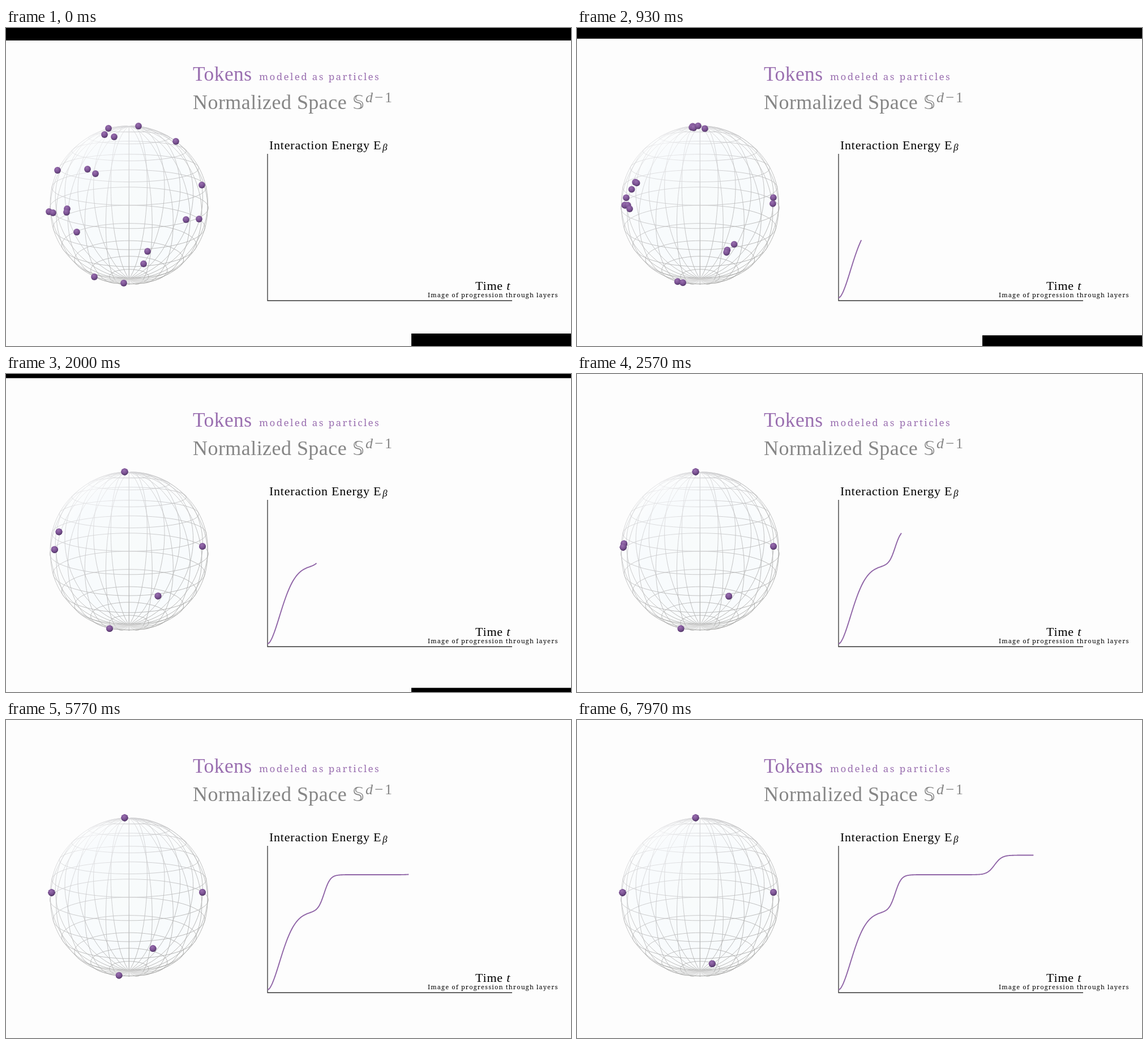
An HTML page for the animation above (8 s loop, 998x561 px).

```html
<!DOCTYPE html>
<html lang="en">
<head>
<meta charset="utf-8">
<title>Tokens on a sphere</title>
<style>
  html, body { margin: 0; width: 100%; height: 100%; overflow: hidden; background: #fdfdfd; }
  svg { display: block; width: 100%; height: 100%; }
  text { font-family: "Liberation Serif", serif; }
  .small { font-family: "Noto Serif", serif; }
  .math { font-family: "DejaVu Sans", sans-serif; }
  .purple { fill: #9a6fb0; }
  .grey { fill: #868686; }
  .italic { font-style: italic; }
</style>
</head>
<body>
<svg viewBox="0 0 998 561">
  <defs>
    <radialGradient id="glass">
      <stop offset="0" stop-color="#f8fbfb"/>
      <stop offset=".75" stop-color="#f8fbfd"/>
      <stop offset="1" stop-color="#fcfdfd"/>
    </radialGradient>
    <radialGradient id="wire" gradientUnits="userSpaceOnUse" cx="150" cy="200" r="290">
      <stop offset="0" stop-color="#ececee"/>
      <stop offset=".35" stop-color="#cdcdcf"/>
      <stop offset="1" stop-color="#a2a2a0"/>
    </radialGradient>
    <radialGradient id="ball" cx=".4" cy=".3" r=".75">
      <stop offset="0" stop-color="#9a70b0"/>
      <stop offset=".55" stop-color="#7c5394"/>
      <stop offset="1" stop-color="#4f3564"/>
    </radialGradient>
  </defs>

  <circle cx="217.5" cy="313" r="140" fill="url(#glass)"/>
  <path id="mesh" fill="none" stroke="url(#wire)" stroke-width=".85"/>
  <ellipse cx="217" cy="446" rx="28" ry="5" fill="#e4e4e4" opacity=".6"/>

  <text class="purple" x="330" y="92.5" font-size="35.5" letter-spacing=".4">Tokens</text>
  <text class="purple small" x="447" y="92" font-size="17" letter-spacing="2.4">modeled as particles</text>
  <g class="grey">
    <text x="330" y="143" font-size="36" letter-spacing=".45">Normalized Space</text>
    <text class="math" x="612" y="143" font-size="33">𝕊</text>
    <text class="italic" x="635" y="130.5" font-size="26">d</text>
    <text x="651" y="130.5" font-size="27">−</text>
    <text x="669" y="130.5" font-size="26">1</text>
  </g>

  <path d="M462 222V481H894" fill="none" stroke="#333" stroke-width="1.3"/>
  <path id="curve" fill="none" stroke="#8f64a6" stroke-width="1.9" stroke-linejoin="round"/>
  <text x="465" y="214" font-size="22" letter-spacing=".77">Interaction Energy E</text>
  <text class="italic" x="665" y="216" font-size="17">β</text>
  <text x="829" y="462" font-size="22" letter-spacing=".8">Time <tspan class="italic">t</tspan></text>
  <text class="small" x="745" y="475" font-size="11" letter-spacing="1.15">Image of progression through layers</text>

  <g id="tokens" fill="url(#ball)"></g>
  <rect id="topBar" width="998"/>
  <rect id="bottomBar" x="716" width="282"/>
</svg>
<script>
const LOOP = 8000;
const $ = id => document.getElementById(id);
const mix = (a, b, p) => a + (b - a) * p;
const sigmoid = u => 1 / (1 + Math.exp(-u));
const settle = (u, power) => 1 - Math.exp(-(u ** power));

// Wire sphere seen from 15 degrees above, in perspective.
function project(lat, lon) {
  const tilt = Math.PI / 12, nearness = 0.13, scale = 139;
  const x = Math.cos(lat) * Math.sin(lon), y = Math.sin(lat), z = Math.cos(lat) * Math.cos(lon);
  const up = y * Math.cos(tilt) - z * Math.sin(tilt);
  const depth = y * Math.sin(tilt) + z * Math.cos(tilt);
  const k = scale / (1 - nearness * depth);
  return `${(217.3 + x * k).toFixed(1)} ${(312.7 - up * k).toFixed(1)}`;
}
function meshPath(meridians, bands) {
  const line = point => "M" + Array.from({ length: 73 }, (_, i) => point(i / 72)).join("L");
  let d = "";
  for (let i = 0; i < meridians; i++)
    d += line(s => project((s - 0.5) * Math.PI, i / meridians * 2 * Math.PI));
  for (let i = 1; i < bands; i++)
    d += line(s => project((i / bands - 0.5) * Math.PI, s * 2 * Math.PI));
  return d;
}
$("mesh").setAttribute("d", meshPath(24, 12));

// Tokens first gather into clusters; some clusters then merge in pairs.
const gather = t => settle(t / 650, 1.5);
const stay = () => 0;
const mergeLeft = t => sigmoid((t - 2380) / 130);
const mergeBottom = t => {
  const drift = Math.min(1, 0.3 * Math.exp((t - 5770) / 1300));
  return mix(drift, 1, sigmoid((t - 6400) / 150));
};

const LEFT = [80.5, 304.5], BOTTOM = [238.7, 430];
const clusters = [
  { from: [209.5, 172.5], to: [209.5, 172.5], merge: stay,
    starts: [[181, 177], [174, 188], [191, 192], [234, 173], [300, 200]] },
  { from: [347, 304], to: [347, 304], merge: stay,
    starts: [[346, 277], [341, 337]] },
  { from: [94, 277], to: LEFT, merge: mergeLeft,
    starts: [[144, 249], [108, 319], [158, 257]] },
  { from: [86, 310], to: LEFT, merge: mergeLeft,
    starts: [[91, 251], [76, 324], [83, 326], [107, 325], [125, 360]] },
  { from: [269, 391], to: BOTTOM, merge: mergeBottom,
    starts: [[318, 338], [250, 394], [243, 416]] },
  { from: [182, 449], to: BOTTOM, merge: mergeBottom, bow: 9,
    starts: [[156, 439], [208, 450]] }
];

const tokens = clusters.flatMap(({ from, to, merge, bow = 0, starts }) => starts.map(([x, y]) => {
  const dot = document.createElementNS("http://www.w3.org/2000/svg", "circle");
  dot.setAttribute("r", 5.9);
  $("tokens").append(dot);
  return t => {
    const g = gather(t), m = merge(t);
    dot.setAttribute("cx", mix(x, mix(from[0], to[0], m), g));
    dot.setAttribute("cy", mix(y, mix(from[1], to[1], m) + bow * Math.sin(Math.PI * m), g));
  };
}));

// Energy climbs once while gathering and once per merge.
const energy = x => 476
  - 138 * settle((x - 462) / 34, 1.75)
  - 65 * sigmoid((x - 562) / 5.5)
  - 34.5 * sigmoid((x - 737.5) / 6.5);

function draw(t) {
  const end = 462 + 0.0432 * t;
  let d = "M462 476";
  for (let x = 463; x < end; x += 1.5) d += `L${x} ${energy(x).toFixed(2)}`;
  $("curve").setAttribute("d", d + `L${end} ${energy(end)}`);

  for (const move of tokens) move(t);

  const bar = Math.max(0, 22 * (1 - (t / 2450) ** 2));
  $("topBar").setAttribute("height", bar);
  $("bottomBar").setAttribute("y", 561 - bar);
  $("bottomBar").setAttribute("height", bar);
}

const start = performance.now();
function tick() {
  draw((performance.now() - start) % LOOP);
  requestAnimationFrame(tick);
}
tick();
</script>
</body>
</html>
```
